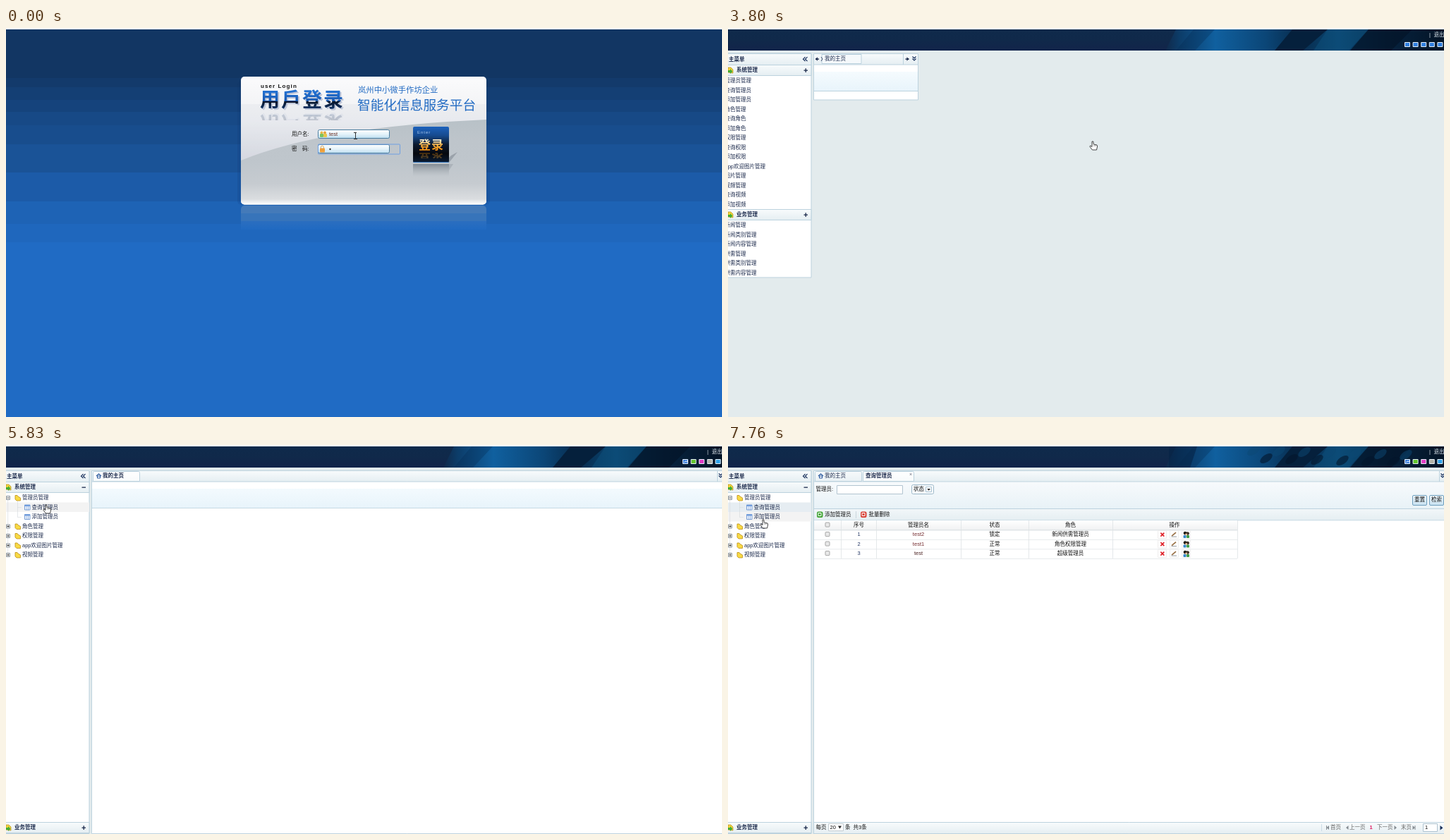
These frames come from a looping animation (1015 by 552 pixels, 8000 ms). An HTML page with a canvas:

```html
<!DOCTYPE html>
<html>
<head>
<meta charset="utf-8">
<style>
html, body { margin: 0; width: 100%; height: 100%; overflow: hidden; }
canvas { display: block; width: 1015px; height: 552px; }
</style>
</head>
<body>
<canvas id="stage" width="1015" height="552"></canvas>
<script>
const ctx = document.getElementById('stage').getContext('2d');
const LOOP = 8000, INK = '#1c2a4c', LINE = '#bcd2de';
const FAMILY = '"Liberation Sans", "Noto Sans CJK SC", "Noto Sans CJK", sans-serif';

function fade(y0, y1, ...colors) {
  const g = ctx.createLinearGradient(0, y0, 0, y1);
  colors.forEach((c, i) => g.addColorStop(i / (colors.length - 1), c));
  return g;
}
function box(x, y, w, h, fill, stroke, radius = 0) {
  ctx.beginPath();
  ctx.roundRect(x, y, w, h, radius);
  if (fill) { ctx.fillStyle = fill; ctx.fill(); }
  if (stroke) { ctx.strokeStyle = stroke; ctx.lineWidth = 1; ctx.stroke(); }
}
function poly(points, fill, stroke, width = 1) {
  ctx.beginPath();
  points.forEach(([x, y]) => ctx.lineTo(x, y));
  if (fill) { ctx.closePath(); ctx.fillStyle = fill; ctx.fill(); }
  if (stroke) { ctx.strokeStyle = stroke; ctx.lineWidth = width; ctx.stroke(); }
}
function dot(x, y, r, fill) {
  ctx.beginPath();
  ctx.arc(x, y, r, 0, 7);
  ctx.fillStyle = fill;
  ctx.fill();
}
function text(str, x, y, { size = 7.5, color = INK, weight = 400, align = 'left', spacing = 0 } = {}) {
  ctx.font = `${weight} ${size}px ${FAMILY}`;
  ctx.letterSpacing = spacing + 'px';
  ctx.textAlign = align;
  ctx.textBaseline = 'middle';
  ctx.fillStyle = color;
  ctx.fillText(str, x, y);
}
function clipped(x, y, w, h, draw) {
  ctx.save();
  ctx.beginPath();
  ctx.rect(x, y, w, h);
  ctx.clip();
  draw();
  ctx.restore();
}
function mirrored(y, alpha, draw) {
  ctx.save();
  ctx.globalAlpha = alpha;
  ctx.translate(0, 2 * y);
  ctx.scale(1, -1);
  draw();
  ctx.restore();
}

// Cursor positions: time, x, y, shape; each holds until the next.
const moves = [
  [0, 495, 153, 'beam'], [2670, 528, 160, 'beam'], [2810, 565, 170, 'arrow'],
  [2950, 598, 174, 'hand'], [3090, 607, 174, 'hand'], [3800, 517, 161, 'hand'],
  [4190, 440, 140, 'arrow'], [4320, 330, 105, 'arrow'], [4460, 220, 70, 'arrow'],
  [4610, 152, 53, 'arrow'], [4730, 190, 66, 'arrow'], [4850, 250, 90, 'arrow'],
  [4990, 273, 101, 'arrow'], [5130, 235, 75, 'arrow'], [5270, 190, 46, 'arrow'],
  [5410, 140, 39, 'arrow'], [5550, 100, 55, 'arrow'], [5690, 75, 75, 'arrow'],
  [5830, 57, 85, 'hand'], [6260, 361, 116, 'arrow'], [6380, 355, 118, 'arrow'],
  [6520, 280, 120, 'arrow'], [6660, 190, 122, 'arrow'], [6800, 100, 120, 'arrow'],
  [6940, 50, 117, 'hand'], [7090, 27, 115, 'hand'], [7240, 31, 115, 'hand'],
  [7370, 37, 113, 'hand'], [7500, 43, 111, 'hand'], [7630, 48, 108, 'hand'],
  [7760, 50, 106, 'hand']
];
const shapes = {
  arrow: [[0, 0], [0, 10], [2.3, 8], [4, 11.5], [5.6, 10.8], [4, 7.4], [7, 7.2], [0, 0]],
  hand: [[-1, 0], [.8, 0], [1.2, 4], [6, 5], [6.6, 7], [5.5, 12], [-.5, 12], [-4, 7.5],
    [-3.5, 6], [-1, 7.5], [-1, 0]]
};
function cursor(t) {
  const [, x, y, shape] = moves.findLast(m => m[0] <= t);
  ctx.save();
  ctx.translate(x, y);
  if (shape === 'beam') {
    poly([[-2, -4.5], [2, -4.5]], null, '#333');
    poly([[.5, -4.5], [.5, 4.5]], null, '#333');
    poly([[-2, 4.5], [3, 4.5]], null, '#333');
  } else {
    poly(shapes[shape], '#fff', '#333', .9);
    if (shape === 'hand') [2, 4].forEach(k => poly([[k, 5], [k, 7]], null, '#555', .6));
  }
  ctx.restore();
}

const bands = [[0, '#eef1f4'], [2, '#123663'], [71, '#133a6b'], [84, '#143f74'], [102, '#15437c'],
  [119, '#174986'], [138, '#184d8d'], [165, '#1a5397'], [205, '#1c5ba8'], [246, '#1e63b5'],
  [278, '#1f67bd'], [304, '#206bc4']];

function field(y) {
  box(442.5, y + .5, 101, 12, fade(y, y + 13, '#ffffff', '#e5f3fa', '#b9dbee'), '#4a7d9f', 2);
}
function loginButton() {
  box(577, 140, 51, 51, fade(140, 191, '#1d62bd', '#164a8e', '#0c1a2e', '#05080e', '#0b1c34'), null, 2);
  box(577.5, 190, 50, 1, '#3277c0');
  text('Enter', 583, 148.5, { size: 6, color: '#a9c8ee', spacing: 1 });
  const label = () => text('登录', 585, 167, {
    size: 17, weight: 900, color: fade(159, 175, '#fff0d0', '#ffae35', '#f58a09'), spacing: 1
  });
  label();
  clipped(577, 175, 51, 10, () => mirrored(175.5, .3, label));
}
function login(t) {
  bands.forEach(([y, color]) => box(0, y, 1015, 552 - y, color));
  box(328, 75, 358, 176, 'rgba(10,45,95,.13)', null, 6);
  box(333, 252, 348, 11, '#447ab9', null, [5, 5, 0, 0]);
  box(333, 263, 348, 11, '#3774ba');
  box(333, 274, 348, 12, fade(274, 286, '#2b6ebf', '#206ac2'));

  ctx.save();
  ctx.beginPath();
  ctx.roundRect(333, 69, 348, 181.5, 5);
  ctx.clip();
  box(333, 69, 348, 182, fade(69, 190, '#fbfbfc', '#eff0f3', '#d5d8e0'));
  box(333, 108, 348, 83, 'rgba(205,208,219,.2)');
  ctx.beginPath();
  ctx.moveTo(333, 188);
  ctx.quadraticCurveTo(450, 140, 681, 130);
  ctx.lineTo(681, 251);
  ctx.lineTo(333, 251);
  ctx.fillStyle = fade(130, 251, '#b8c1c7', '#bec5cb', '#bfc6cc', '#c6cbd0', '#e2e4e6');
  ctx.fill();
  box(333, 243, 348, 8, fade(243, 251, 'rgba(255,255,255,0)', '#fff'));
  ctx.restore();

  text('user Login', 361, 83, { size: 8, weight: 700, color: '#111', spacing: 1.1 });
  const title = () => {
    text('用戶登录', 362, 106, { size: 28, weight: 900, color: '#bfc6d8', spacing: 2 });
    const g = ctx.createLinearGradient(0, 91, 0, 118);
    [[0, '#2370d0'], [.46, '#1859b2'], [.5, '#071326'], [1, '#123f80']].forEach(s => g.addColorStop(...s));
    text('用戶登录', 360, 104.5, { size: 28, weight: 900, color: g, spacing: 2 });
  };
  title();
  clipped(355, 119, 130, 12, () => mirrored(118.5, .18, title));
  text('岚州中小微手作坊企业', 499, 89, { size: 11.35, weight: 500, color: '#226bc3' });
  text('智能化信息服务平台', 498, 110.5, { size: 18.7, weight: 500, color: '#226bc3' });

  const label = { color: '#111' };
  text('用户名:', 405, 151, label);
  text('密　码:', 405, 172, label);
  field(144);
  field(165);
  dot(447.5, 148.5, 2, '#e8b94a');
  dot(452, 148.5, 2, '#e6a23c');
  box(445, 150, 5, 5, '#7dc35d', null, 1);
  box(450, 150, 5, 5, '#e9c64d', null, 1);
  box(446.3, 167.2, 4, 6, null, '#d9a557', 2);
  box(445, 170.5, 7, 6, '#f0a03a', null, 1);
  text('test', 458, 151, { color: '#6b2c20' });

  const keys = [1125, 1260, 1395, 1530, 1810, 1960];
  const count = t < 280 ? 1 : keys.filter(k => k <= t).length;
  for (let i = 0; i < count; i++) dot(459.5 + i * 3.05, 172, 1.15, '#222');
  if ((t >= 280 && t < 990) || (t >= 1125 && t < 2390)) box(457.5 + count * 3.05, 167.5, .8, 9, '#222');
  if (t < 2810) box(442.5, 165, 116, 14, null, '#6f9fe2', 1);

  poly([[628, 191], [640, 176], [631, 181], [628, 184]], 'rgba(110,120,130,.45)');
  loginButton();
  clipped(577, 193, 60, 18, () => {
    box(577, 193, 51, 18, fade(193, 211, 'rgba(70,80,90,.5)', 'rgba(150,158,165,0)'));
    poly([[628, 193], [634, 193], [628, 202]], 'rgba(110,120,130,.25)');
  });
  if (t >= 3090) box(577, 140.5, 68, 75, null, '#78a6e4');
}

function header(loaded, busy) {
  box(0, 0, 1015, 552, '#e3ebed');
  box(0, 0, 1015, 2, '#f3f6f7');
  clipped(0, 2, 1015, 30, () => {
    box(0, 2, 1015, 30, fade(2, 32, '#0f2a4b', '#10294a', '#12244a'));
    const glow = ctx.createLinearGradient(620, 0, 1015, 0);
    [[0, '#10294a'], [.05, '#0c3c68'], [.18, '#10609f'], [.36, '#0b4677'], [.48, '#072c4e'],
      [.62, '#0a446f'], [.8, '#06233f'], [1, '#041426']].forEach(s => glow.addColorStop(...s));
    poly([[635, 2], [1015, 2], [1015, 32], [620, 32]], glow);
    poly([[800, 2], [850, 2], [815, 32], [775, 32]], '#05203c');
    poly([[850, 2], [908, 2], [880, 32], [830, 32]], 'rgba(14,84,130,.45)');
    poly([[908, 2], [970, 2], [940, 32], [882, 32]], 'rgba(3,20,40,.75)');
    poly([[660, 2], [690, 2], [662, 32], [635, 32]], 'rgba(5,40,80,.3)');
    if (busy) {
      poly([[625, 2], [665, 2], [655, 32], [625, 32]], 'rgba(6,36,70,.6)');
      for (let i = 0; i < 14; i++) {
        ctx.beginPath();
        ctx.ellipse(745 + i * 18, 8 + (i * 11) % 21, 10, 5, -.6, 0, 7);
        ctx.fillStyle = i % 2 ? 'rgba(3,22,44,.6)' : 'rgba(12,72,116,.5)';
        ctx.fill();
      }
    }
  });
  text('|', 994, 10, { color: '#dde5ee' });
  text('退出', 1000.5, 10, { color: '#dde5ee' });
  const colors = ['#3b7edb', '#62c52a', '#e03bc4', '#b2b2a8', '#2fa2e9'];
  colors.forEach((c, i) => box(959.5 + i * 11.6, 20.5, 7, 6, loaded ? c : '#2f7fe0', '#e8f1fa'));
  if (loaded) poly([[961, 25], [963, 23], [965, 24], [966, 22]], null, '#fff', .8);
}
function bar(x, y, w, h) {
  box(x, y, w, h, fade(y, y + h, '#f8fbfc', '#e5eef2'), LINE);
}
function chevrons(x, y, dx, dy) {
  for (const k of [0, 3])
    poly(dx ? [[x + k + 3, y - 3], [x + k, y], [x + k + 3, y + 3]]
            : [[x - 2.5, y + k - 3], [x, y + k - .5], [x + 2.5, y + k - 3]], null, '#132b58', 1.2);
}
function section(name, y, open) {
  bar(-1, y + .5, 119, 15);
  poly([[0, y + 4], [4, y + 4], [7, y + 7], [7, y + 12], [0, y + 11]], '#f2d33c', '#b58a18', .7);
  poly([[0, y + 8], [3, y + 8], [3, y + 6], [6.5, y + 9.5], [3, y + 13], [3, y + 11], [0, y + 11]], '#45ad33');
  text(name, 12, y + 8.3, { weight: 700 });
  box(107.5, y + 7.5, 5.5, 1.3, INK);
  if (!open) box(109.6, y + 5.3, 1.3, 5.7, INK);
}
function sidebarTop() {
  bar(-1, 36.5, 119, 16);
  text('主菜单', 1, 44.5, { weight: 700 });
  chevrons(106.5, 44.2, 1, 0);
}
function rawPage() {
  header(false);
  box(-1, 36, 119, 318, '#fff', LINE);
  sidebarTop();
  section('系统管理', 52, false);
  const list = (names, y) => names.forEach((n, i) => text(n, -4.5, y + i * 13.5));
  list(['管理员管理', '查询管理员', '添加管理员', '角色管理', '查询角色', '添加角色', '权限管理', '查询权限',
    '添加权限', 'app欢迎图片管理', '图片管理', '视频管理', '查询视频', '添加视频'], 75.3);
  section('业务管理', 257, false);
  list(['新闻管理', '新闻类别管理', '新闻内容管理', '供需管理', '供需类别管理', '供需内容管理'], 280.3);

  box(121.5, 36.5, 148, 65.5, '#fff', LINE);
  bar(121.5, 36.5, 148, 15.5);
  box(133, 37.5, 56, 13, '#f5f9fb', LINE);
  box(122, 62, 147, 27, fade(62, 89, '#f5fbfe', '#e8f4fb'));
  box(122, 89, 147, 1, LINE);
  poly([[132, 41], [134, 44], [132, 47]], null, INK, .8);
  text('我的主页', 137, 44);
  for (const [x, d] of [[124, 1], [256.5, -1]]) {
    box(Math.min(x, x + d * 5), 43.4, 5, 1.4, INK);
    poly([[x, 44], [x + d * 3, 41.2], [x + d * 3, 46.8]], INK);
  }
  box(248, 37, 1, 15, LINE);
  chevrons(264, 43.5, 0, 1);
}

function folder(x, y) {
  poly([[x, y - 3.5], [x + 3, y - 3.5], [x + 4, y - 2], [x + 7.5, y], [x + 7.5, y + 4], [x + 2, y + 4],
    [x, y + 2], [x, y - 3.5]], '#f8da45', '#bb8d16', .8);
}
function tree(t) {
  const hover = t >= 7760 ? 95 : t >= 5830 && t < 6110 ? 81.5 : 0;
  if (hover) box(0, hover, 118, 13.5, '#f3f3f3');
  if (t >= 6110) box(0, 81.5, 118, 13.5, '#e6edf2');
  const rows = ['管理员管理', '查询管理员', '添加管理员', '角色管理', '权限管理', 'app欢迎图片管理', '视频管理'];
  box(2.5, 78, .6, 78, '#d3d8dc');
  box(16, 80, .6, 22, '#d3d8dc');
  rows.forEach((name, i) => {
    const y = 75 + i * 13.5, leaf = i === 1 || i === 2;
    if (leaf) {
      box(16, y, 6, .6, '#d3d8dc');
      box(26.5, y - 3.5, 7.5, 7, '#eff6ff', '#7a9ed3');
      box(26.5, y - 3.5, 7.5, 2, '#6f9de0');
      box(28.7, y - 3, .7, 7, '#7a9ed3');
      box(31.2, y - 3, .7, 7, '#7a9ed3');
    } else {
      box(.5, y - 2.5, 5, 5, '#fff', '#8a939b');
      box(1.5, y - .4, 3, .9, '#222');
      if (i) box(2.6, y - 1.5, .9, 3, '#222');
      folder(13, y);
    }
    text(name, leaf ? 36.5 : 23, y + .3);
  });
}
function tab(x, w, name, active, textX) {
  box(x + .5, 37.5, w, 14, active ? fade(37, 52, '#ffffff', '#f7fafb') : fade(37, 52, '#f7fafb', '#e8f0f4'), LINE, [2, 2, 0, 0]);
  text(name, textX, 44, { weight: active ? 700 : 400 });
}
function workspace(t) {
  const listing = t >= 6110;
  header(true, listing);
  box(-1, 36.5, 119, 515, '#fff', LINE);
  sidebarTop();
  section('系统管理', 52, true);
  tree(t);
  section('业务管理', 535, false);
  box(121.5, 36.5, 900, 515, '#fff', LINE);
  bar(121.5, 36.5, 900, 15.5);
  tab(123, 66, '我的主页', !listing, 137);
  poly([[128, 44], [131.5, 41], [135, 44]], null, '#24549b', 1.1);
  box(129.5, 44, 4, 3, '#fff', '#24549b');
  box(1008, 37, 1, 15, LINE);
  chevrons(1013, 43.5, 0, 1);
  if (listing) userList();
  else {
    box(122, 62, 893, 27, fade(62, 89, '#f3fafe', '#e8f4fb'));
    box(122, 89, 893, 1, '#c4d9e4');
  }
}

function rowIcons(y) {
  for (const x of [609.5, 626.5, 643.5]) box(x, y - 5.5, 12, 11, '#fff', '#eeeeee');
  poly([[613.3, y - 2.5], [618.3, y + 2.5]], null, '#df1f27', 1.6);
  poly([[618.3, y - 2.5], [613.3, y + 2.5]], null, '#df1f27', 1.6);
  poly([[629, y + 2], [635, y - 3]], null, '#997147', 1.8);
  poly([[628.5, y + 3], [636, y + 3]], null, '#8a9097', .9);
  dot(648, y - 2, 2.4, '#242019');
  dot(651.5, y - 1.5, 2.4, '#3a2c20');
  dot(649.7, y, 1.5, '#f1c49a');
  box(645.5, y + 1, 4, 4, '#3787c9', null, 1);
  box(650, y + 1, 4, 4, '#3f9d48', null, 1);
}
function userList() {
  tab(191, 72, '查询管理员', true, 195);
  text('×', 259, 42, { size: 7, color: '#667', align: 'center' });
  box(122, 53, 893, 37, fade(53, 90, '#f7fafc', '#e8f2f7'));
  box(122, 90, 893, 17, fade(90, 107, '#f2f7f9', '#e5eef2'));
  box(122, 90, 893, 1, LINE);
  box(122, 106.5, 893, .8, LINE);
  const black = { color: '#111' };
  text('管理员:', 124.5, 63, black);
  box(154.5, 57.5, 93, 12, '#fff', '#b2c4d0');
  box(260.5, 56.5, 31, 13, '#f8fbfd', '#9db8c9', 2);
  text('状态', 263, 63, black);
  box(280.5, 59.5, 8, 7, '#fff', '#a8c2d2');
  poly([[282.3, 62], [287, 62], [284.6, 64.7]], '#222');
  [['重置', 970.5], ['检索', 994.5]].forEach(([name, x]) => {
    box(x, 71.5, 20, 14, fade(71, 86, '#f2f9fd', '#c5e0f0'), '#6f9fbd', 1.5);
    text(name, x + 2.5, 78, black);
  });
  box(126, 94.5, 8.5, 8.5, '#43a636', null, 2);
  box(128, 96.5, 4, 4, null, '#fff');
  text('添加管理员', 137, 99, black);
  box(181, 94, .7, 10, '#bdcbd2');
  box(188, 94.5, 8.5, 8.5, '#d84237', null, 2);
  box(190, 96.5, 4, 4, null, '#fff');
  text('批量删除', 199.5, 99, black);

  box(122, 107.3, 600, 13.2, fade(107, 120, '#ffffff', '#f1f2f3'));
  [['序号', '管理员名', '状态', '角色', '操作'],
   ['1', 'test2', '锁定', '新闻供需管理员'],
   ['2', 'test1', '正常', '角色权限管理'],
   ['3', 'test', '正常', '超级管理员']].forEach((row, r) => {
    const y = 113.6 + r * 13.5;
    box(122, y + 6.9, 600, .7, r ? '#e0e4e7' : '#c8cfd4');
    box(138, y - 3.5, 6, 6, '#e9e9e9', '#a5a5a5', 1);
    row.forEach((cell, c) => {
      const color = !r || c > 1 ? '#111' : c ? (r < 3 ? '#752d30' : '#4c2424') : '#253865';
      text(cell, [185.5, 270, 378, 485.5, 633][c], y + .3, { align: 'center', color });
    });
    if (r) rowIcons(y);
  });
  [160, 210, 330, 426, 545, 722].forEach(x => box(x, 107, .8, 54, '#dde2e5'));

  bar(121.5, 535.5, 900, 16);
  text('每页', 124.5, 543, black);
  box(142.5, 537.5, 21, 10, '#fff', '#c2cbd0');
  text('20', 144.5, 542.5, black);
  poly([[156, 540.5], [161, 540.5], [158.5, 544.5]], '#222');
  text('条', 166, 543, black);
  text('共3条', 177.5, 543, black);
  const grey = '#858c92';
  [['首页', 854], ['上一页', 881], ['下一页', 920], ['末页', 954]].forEach(([n, x]) => text(n, x, 543, { color: '#666' }));
  text('1', 909.5, 543, { color: '#e01b62', weight: 700 });
  [[848.5, 1], [876, 1], [948, -1], [974, -1]].forEach(([x, d], i) => {
    poly([[x, 543], [x + d * 3.5, 540], [x + d * 3.5, 546]], grey);
    if (i % 3 === 0) box(x - .5, 540, 1, 6, grey);
  });
  box(841, 538, .7, 10, LINE);
  box(985.5, 537.5, 20, 11, '#fff', '#afc3d0');
  text('1', 988, 543, black);
  poly([[1009.5, 540], [1013.5, 543.3], [1009.5, 546.5]], '#172d58');
}

function render(now) {
  const t = now % LOOP;
  if (t < 3800) login(t);
  else if (t < 4050) rawPage();
  else workspace(t);
  cursor(t);
}
const start = performance.now();
function tick() {
  render(performance.now() - start);
  requestAnimationFrame(tick);
}
tick();
</script>
</body>
</html>
```
